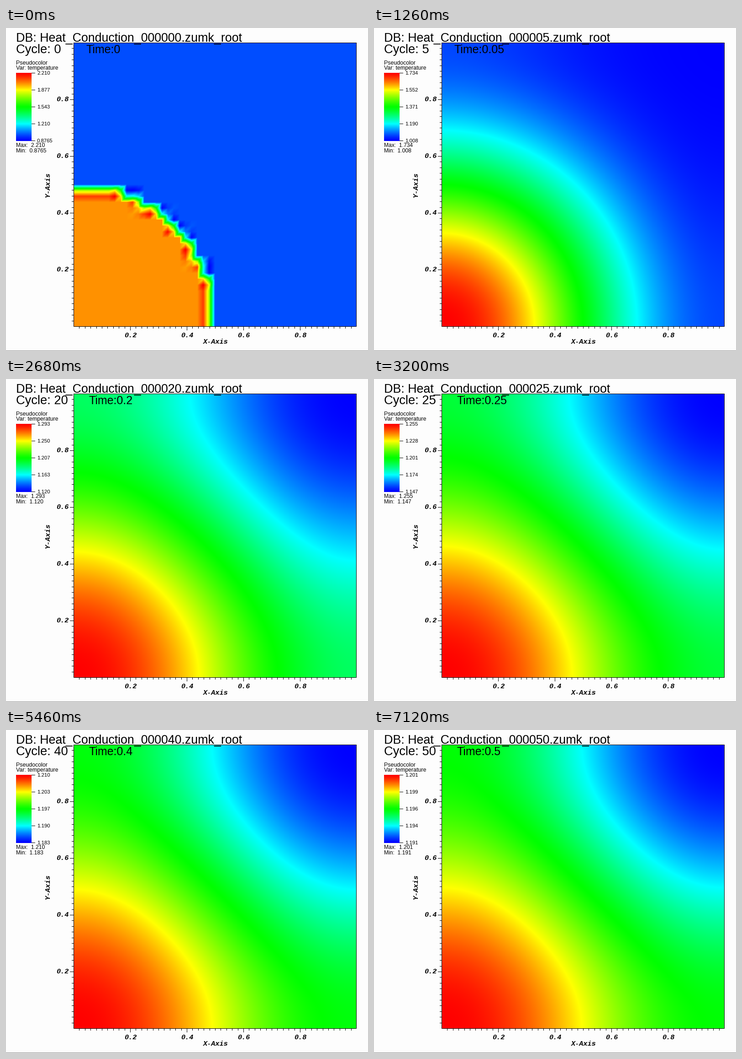
Animation, 793 px wide and 706 px high, one loop 7.22 s. Source, as a matplotlib script:

```python
import numpy as np
import matplotlib.pyplot as plt
from matplotlib.animation import FuncAnimation

W, H, DPI = 793, 706, 100
LEFT, TOP, SIDE = 148, 32, 620
BOTTOM = TOP + SIDE
STEP_MS, TICKS = 38, 190
KAPPA, GAMMA = 0.945, 1.17

# First tick of each saved state, and the temperature range shown for it
STARTS = [0, 18, 36, 55, 69, 84, 103, 121, 137, 155, 173]
RANGES = [(0.8765, 2.2100), (1.0083, 1.7337), (1.0427, 1.4888),
          (1.0860, 1.3610), (1.1200, 1.2930), (1.1470, 1.2550),
          (1.1640, 1.2320), (1.1760, 1.2190), (1.1832, 1.2100),
          (1.1880, 1.2050), (1.1912, 1.2012)]

pos = (np.arange(SIDE) + 0.5) / SIDE


def initial_field(cells=16, lod=3):
    """Hot quarter disc on biquadratic elements, each cut into lod x lod quads."""
    node = np.arange(2 * cells + 1)
    hot = node[:, None] ** 2 + node[None, :] ** 2 < cells ** 2
    size = cells * lod
    basis = np.zeros((size + 1, node.size))
    for g in range(size + 1):
        e = min(g // lod, cells - 1)
        s = g / lod - e
        basis[g, 2 * e:2 * e + 3] = ((1 - s) * (1 - 2 * s),
                                     4 * s * (1 - s), s * (2 * s - 1))
    v = basis @ (1.0 + hot) @ basis.T

    # Two flat triangles per quad, split along the rising diagonal
    cell = (pos * size).astype(int)
    frac = pos * size - cell
    r, c = cell[:, None], cell[None, :]
    fr, fc = frac[:, None], frac[None, :]
    corner = np.where(fc > fr, v[r, c + 1], v[r + 1, c])
    near, far = np.minimum(fr, fc), np.maximum(fr, fc)
    return (1 - far) * v[r, c] + (far - near) * corner + near * v[r + 1, c + 1]


u0 = initial_field()
modes = np.arange(24)
cosines = np.cos(np.pi * np.outer(pos, modes))
norm = np.where(modes == 0, 1, 2) / SIDE
coef = (cosines * norm).T @ u0 @ (cosines * norm)
decay = np.pi ** 2 * KAPPA * (modes[:, None] ** 2 + modes[None, :] ** 2)


def field(t):
    if t == 0:
        return u0
    return cosines @ (coef * np.exp(-decay * t)) @ cosines.T


def hot_colors(f):
    """Blue, cyan, green, yellow, red in equal steps, slightly darkened."""
    stops = np.linspace(0, 1, 5)
    rgb = [np.interp(f, stops, c) for c in
           ((0, 0, 0, 1, 1), (0, 1, 1, 1, 0), (1, 1, 0, 0, 0))]
    return np.round(np.stack(rgb, axis=-1) ** GAMMA * 255).astype(np.uint8)


def picture(k):
    u = field(0.05 * k)
    return hot_colors((u - u.min()) / (u.max() - u.min()))


pictures = [picture(k) for k in range(len(STARTS))]

fig = plt.figure(figsize=(W / DPI, H / DPI), dpi=DPI, facecolor="#fdfdfd")
ax = fig.add_axes([0, 0, 1, 1])
ax.axis("off")

image = ax.imshow(pictures[0], extent=(LEFT, LEFT + SIDE, BOTTOM, TOP),
                  origin="lower", interpolation="nearest", aspect="auto")
ax.imshow(hot_colors(np.linspace(0, 1, 149))[:, None], origin="lower",
          extent=(22, 56, 247, 98), interpolation="nearest", aspect="auto")
ax.set_xlim(0, W)
ax.set_ylim(H, 0)


def line(xs, ys, color="black"):
    ax.plot(xs, ys, color=color, lw=0.72, solid_capstyle="butt",
            solid_joinstyle="miter", snap=False)


def text(x, y, s, px, **kw):
    kw = {"family": "Liberation Sans", "va": "baseline", **kw}
    return ax.text(x, y, s, fontsize=px * 72 / DPI, color="black", **kw)


def axis_text(x, y, s, **kw):
    return text(x, y, s, 15.2, family="Liberation Mono", weight="bold",
                style="italic", **{"ha": "center", "va": "center", **kw})


# Plot border, ticks and axis names
l, t = LEFT + 0.5, TOP + 0.5
r, b = LEFT + SIDE - 0.5, BOTTOM + 0.5
line([l, r, r, l, l, r], [t, t, b, b, t, t])
line([0, W], [H - 0.5] * 2, "#8c8c8c")
for i in range(1, 50):
    major = i % 10 == 0
    size = 8 if major else 4
    x = round(LEFT + i * SIDE / 50) + 0.5
    y = round(BOTTOM - i * SIDE / 50) + 0.5
    line([x, x], [BOTTOM, BOTTOM + size + 1])
    line([LEFT - size, LEFT], [y, y])
    if major:
        axis_text(x + 0.5, 671.5, f"{i / 50:.1f}")
        axis_text(137.5, y - 1, f"{i / 50:.1f}", ha="right")
axis_text(459, 686.5, "X-Axis")
axis_text(91.5, 342.5, "Y-Axis", rotation=90)

# Header and legend
title = text(21.5, 30.5, "", 26.8)
cycle = text(21.5, 55, "", 27.2)
clock = text(176, 55, "", 25)
text(22, 80, "Pseudocolor", 12.4)
text(22, 91, "Var: temperature", 12.4)
scale = []
for i in range(5):
    y = round(246 - i * 37) + 0.5
    line([56, 64], [y, y])
    scale.append(text(68, y + 3.5, "", 11.3))
high = text(22, 260.5, "", 12)
low = text(22, 271.5, "", 12)


def num(v):
    return f"{v:#.4g}"


def update(tick):
    k = int(np.searchsorted(STARTS, tick, side="right")) - 1
    lo, hi = RANGES[k]
    image.set_data(pictures[k])
    title.set_text(f"DB: Heat_Conduction_{5 * k:06d}.zumk_root")
    cycle.set_text(f"Cycle: {5 * k}")
    clock.set_text(f"Time:{0.05 * k:.2g}")
    clock.set_x(176 if k < 2 else 182)
    for i, label in enumerate(scale):
        label.set_text(num(lo + (hi - lo) * i / 4))
    high.set_text(f"Max:  {num(hi)}")
    low.set_text(f"Min:  {num(lo)}")
    return [image, title, cycle, clock, high, low, *scale]


anim = FuncAnimation(fig, update, frames=TICKS, interval=STEP_MS,
                     repeat=True, repeat_delay=0)
plt.show()
```
